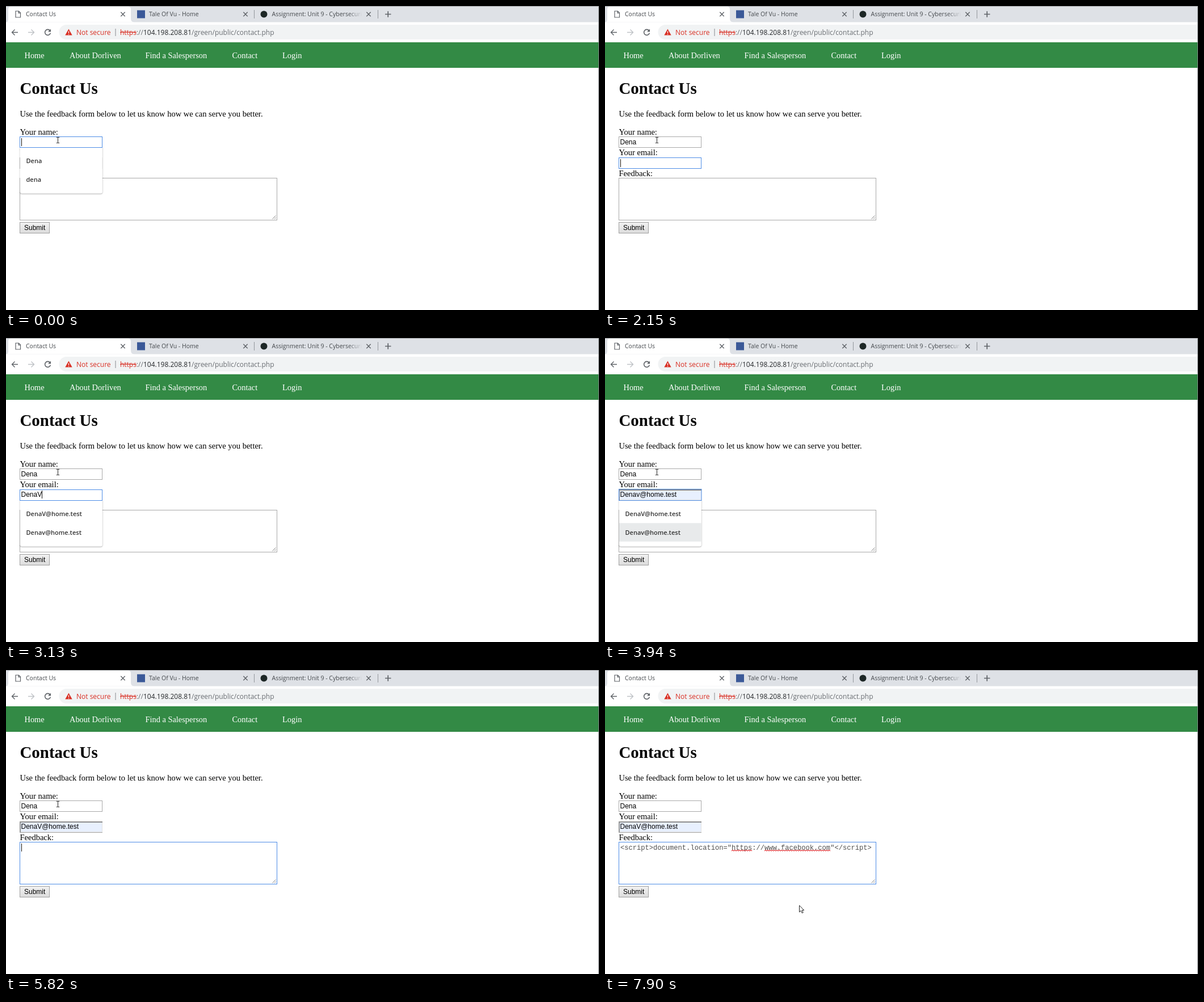
Write an HTML page that moves like this. It is 1045x536 px and loops after 8 s.

```html
<!DOCTYPE html>
<html lang="en">
<head>
<meta charset="utf-8">
<title>Contact Us</title>
<style>
  html, body { margin: 0; width: 100%; height: 100%; overflow: hidden; background: #fff; }
  svg { display: block; width: 1045px; height: 536px; }
  text { white-space: pre; }
  .ui { font-family: "Open Sans", "Noto Sans", sans-serif; }
  .tab { font-size: 10.5px; fill: #45494d; }
  .url { font-size: 12px; fill: #6a6e73; }
  .page { font-family: "Liberation Serif", "Times New Roman", serif; font-size: 14.5px; }
  .nav { font-size: 14.4px; fill: #fff; }
  .field { font-family: "Liberation Sans", Arial, sans-serif; font-size: 12px; }
  .code { font-family: "Liberation Mono", "Courier New", monospace; font-size: 12.1px; fill: #505050; }
  .item { font-size: 11px; font-weight: 600; fill: #333; }
  .line { fill: none; stroke: #5f6368; stroke-width: 1.4; }
  .box { fill: #fff; stroke: #a9a9a9; stroke-width: 1; }
  .focus { stroke: #4d8ce6; }
</style>
</head>
<body>
<svg viewBox="0 0 1045 536">
  <defs>
    <linearGradient id="fade">
      <stop offset="0" stop-color="#dee1e6" stop-opacity="0"/>
      <stop offset="1" stop-color="#dee1e6"/>
    </linearGradient>
    <linearGradient id="btn" x2="0" y2="1">
      <stop offset="0" stop-color="#f2f2f2"/>
      <stop offset="1" stop-color="#dcdcdc"/>
    </linearGradient>
    <filter id="shadow" x="-10%" y="-10%" width="120%" height="125%">
      <feDropShadow dx="0" dy="1" stdDeviation="1" flood-color="#000" flood-opacity=".4"/>
    </filter>
    <clipPath id="below"><rect id="edge" width="300" height="300"/></clipPath>
    <clipPath id="title"><rect x="460" y="0" width="167" height="28"/></clipPath>
  </defs>

  <!-- browser chrome -->
  <rect width="1045" height="536" fill="#fff"/>
  <rect width="1045" height="28.5" fill="#dee1e6"/>
  <path d="M0 28.500Q4 28.500 4 23V6Q4 1 9 1H215Q220 1 220 6V22Q220 28.500 226 28.500Z" fill="#fff"/>
  <rect width="1045" height="1" fill="#96989b"/>
  <g class="ui tab">
    <text x="35" y="18">Contact Us</text>
    <text x="252" y="18">Tale Of Vu - Home</text>
    <text x="468.500" y="18" clip-path="url(#title)">Assignment: Unit 9 - Cybersecurity</text>
  </g>
  <rect x="603" y="5" width="25" height="19" fill="url(#fade)"/>
  <path class="line" style="stroke-width:1.2" d="M17 9H22.500L25.500 12V20H17ZM22 9V12.500H25.500"/>
  <rect x="231" y="7.500" width="14" height="14" fill="#3b5998"/>
  <circle cx="454.500" cy="14.500" r="6" fill="#1d2726"/>
  <path class="line" id="closes"/>
  <path d="M437.500 7V22M655.500 7V22" stroke="#93979c"/>
  <path class="line" style="stroke-width:1.700" d="M668 14.500H678.500M673.250 9.250V19.750"/>
  <path class="line" d="M21 46.500H10.500M15.500 41.500L10.500 46.500L15.500 51.500"/>
  <path class="line" style="stroke:#bfc2c6" d="M39 46.500H49.500M44.500 41.500L49.500 46.500L44.500 51.500"/>
  <path class="line" style="stroke-width:1.600" d="M77.500 43.200A5 5 0 1 0 78.400 47.800"/>
  <path d="M79 40.500V45.500H74Z" fill="#5f6368"/>
  <path d="M1045 33H106.500A13 13 0 0 0 106.500 59H1045Z" fill="#f1f3f4"/>
  <path d="M110.500 40.500L116.700 51.500H104.300Z" fill="#d93025"/>
  <path d="M110.500 44.300V48M110.500 49.200V50.400" stroke="#fff" stroke-width="1.200"/>
  <g class="ui url">
    <text x="124" y="50.500" style="fill:#d93025">Not secure</text>
    <text x="201" y="50.500"><tspan fill="#d93025">https</tspan>://<tspan fill="#25282b">104.198.208.81</tspan>/green/public/contact.php</text>
  </g>
  <path d="M193 40V53" stroke="#85898d"/>
  <path d="M201 46.500H230" stroke="#d93025"/>

  <!-- page -->
  <rect y="64" width="1045" height="45" fill="#338a45"/>
  <g class="page nav">
    <text x="32.500" y="92">Home</text>
    <text x="112" y="92">About Dorliven</text>
    <text x="245.500" y="92">Find a Salesperson</text>
    <text x="398.500" y="92">Contact</text>
    <text x="487" y="92">Login</text>
  </g>
  <g class="page">
    <text x="24.500" y="155" style="font-size:28.9px;font-weight:bold">Contact Us</text>
    <text x="24.500" y="195">Use the feedback form below to let us know how we can serve you better.</text>
    <text x="24.500" y="226.500">Your name:</text>
    <text x="24.500" y="263">Your email:</text>
    <text x="24.500" y="299.500">Feedback:</text>
  </g>
  <rect class="box" id="nameBox" x="24.500" y="230.500" width="145" height="19"/>
  <rect class="box" id="mailBox" x="24.500" y="267.500" width="145" height="19"/>
  <g id="filled">
    <rect x="24" y="267" width="146" height="19" fill="#e8f0fe"/>
    <path d="M25 286V268H170" fill="none" stroke="#8d8d8d" stroke-width="1.800"/>
    <path d="M26 285.500H169.500V269" fill="none" stroke="#e3e3e3"/>
    <rect class="focus" id="ring" x="24.500" y="266.500" width="145.500" height="20" fill="none"/>
  </g>
  <rect class="box" id="noteBox" x="24.500" y="303.500" width="453" height="74"/>
  <path d="M469.500 375.500L475.500 369.500M473 375.500L475.500 373" stroke="#777" stroke-width=".9"/>
  <rect x="24.500" y="381.500" width="52" height="19" fill="url(#btn)" stroke="#a0a0a0"/>
  <text class="field" x="32" y="395">Submit</text>
  <text class="field" id="name" x="26.500" y="244"/>
  <text class="field" id="mail" x="26.500" y="280"/>
  <text class="code" id="note" x="27" y="316.600"/>
  <path id="squiggle" fill="none" stroke="#e0393c" stroke-width="1.100"/>
  <rect id="caret" width="1" height="14" fill="#111"/>
  <g clip-path="url(#below)"><g class="ui item" id="menu"></g></g>

  <!-- pointers -->
  <path id="beam" d="M89 231.500H91L91.500 232L92 231.500H94M91.500 232V241M89 241.500H91L91.500 241L92 241.500H94" fill="none" stroke="#222"/>
  <path id="arrow" d="M0 0V11.800L2.800 9.300L4.700 13.500L6.700 12.600L4.900 8.500H8.200Z" fill="#fff" stroke="#222" stroke-width="1"/>
  <path d="M1044.500 0V536" stroke="#77797b"/>
</svg>
<script>
  const LOOP = 8000;
  const $ = id => document.getElementById(id);
  const set = (id, attrs) => { for (const k in attrs) $(id).setAttribute(k, attrs[k]); };
  const show = (id, on) => { $(id).style.display = on ? "" : "none"; };
  const within = (t, a, b) => t >= a && t < b;

  // value of the last [time, value] step that has begun
  const at = (steps, t) => steps.reduce((v, s) => t >= s[0] ? s[1] : v, null);

  const MAIL = ["DenaV@home.test", "Denav@home.test"];
  const THREE = [...MAIL, "Dena@home.test"];
  const FIVE = [...THREE, "dorotheafenwell@homes.test", "dfenwell@home.test"];
  const CODE = '<script>document.location="https://www.facebook.com"<\/script>';

  const names = [[0, ""], [430, "D"], [550, "De"], [820, "Dena"]];
  const mails = [[0, ""], [2430, "D"], [2700, "De"], [2830, "Den"], [3130, "DenaV"],
    [3810, MAIL[0]], [3940, MAIL[1]], [4620, MAIL[0]]];
  const menus = [[0, ["Dena", "dena"]], [1100, null], [2430, FIVE], [2700, THREE], [3130, MAIL], [5010, null]];
  const picks = [[0, -1], [3810, 0], [3940, 1], [4620, 0], [4890, -1]];
  const arrows = [[7510, [14, 300]], [7630, [1, 443]], [7780, [170, 387]], [7900, [342.5, 415]]];
  const carets = [[0, 1], [150, 0], [430, 1], [1690, 0], [2150, 1], [3660, 0], [4890, 1],
    [5410, 0], [5820, 1], [6400, 0], [6800, 1], [7510, 0]];

  const zigzag = (x, end) => {
    let d = `M${x} 319`;
    for (let i = 1; x + i * 2 <= end; i++) d += `L${x + i * 2} ${i % 2 ? 317.5 : 319}`;
    return d;
  };
  set("squiggle", { d: zigzag(223, 260) + zigzag(281, 398) });
  set("closes", { d: [206, 422, 639].map(x =>
    `M${x - 3.7} 10.8l7.4 7.4m0 -7.4l-7.4 7.4`).join("") });

  function menuMarkup(items, top, pick) {
    if (!items) return "";
    const row = 32.6, h = 15 + row * items.length, w = items.length > 3 ? 217 : 145;
    let s = `<rect x="24.8" y="${top - 4}" width="${w}" height="${h + 4}" rx="3" fill="#fff" filter="url(#shadow)"/>`;
    if (pick >= 0)
      s += `<rect x="25" y="${top + 6.7 + pick * row}" width="${w - .4}" height="${row}" fill="#e8eaeb"/>`;
    items.forEach((label, i) => {
      s += `<text x="35.5" y="${top + 27 + i * row}">${label}</text>`;
    });
    return s;
  }

  let lastMenu;
  function render(t) {
    const spot = t < 1100 ? "name" : t < 5820 ? "mail" : "note";
    $("name").textContent = at(names, t);
    $("mail").textContent = at(mails, t);
    $("note").textContent = t >= 7080 ? CODE : "";
    show("squiggle", t >= 7200);
    ["name", "mail", "note"].forEach(id => $(id + "Box").classList.toggle("focus", id === spot));
    show("filled", t >= 3810);
    show("ring", t < 5820);

    const x = spot === "note" ? (t < 7080 ? 27 : 469)
      : Math.ceil(26.1 + $(spot).getComputedTextLength());
    set("caret", { x, y: { name: 233, mail: t < 2430 ? 270 : 269, note: 306 }[spot] });
    show("caret", at(carets, t) && !within(t, 3810, 4890));

    const top = t < 1100 ? 250 : 287;
    const markup = menuMarkup(at(menus, t), top, at(picks, t));
    if (markup !== lastMenu) $("menu").innerHTML = lastMenu = markup;
    set("edge", { y: top });
    set("menu", { opacity: within(t, 4890, 5010) ? .4 : 1 });

    const tip = at(arrows, t);
    show("beam", !tip);
    show("arrow", tip);
    if (tip) set("arrow", { transform: `translate(${tip})` });
  }

  const start = performance.now();
  function frame() {
    render((performance.now() - start) % LOOP);
    requestAnimationFrame(frame);
  }
  frame();
</script>
</body>
</html>
```
